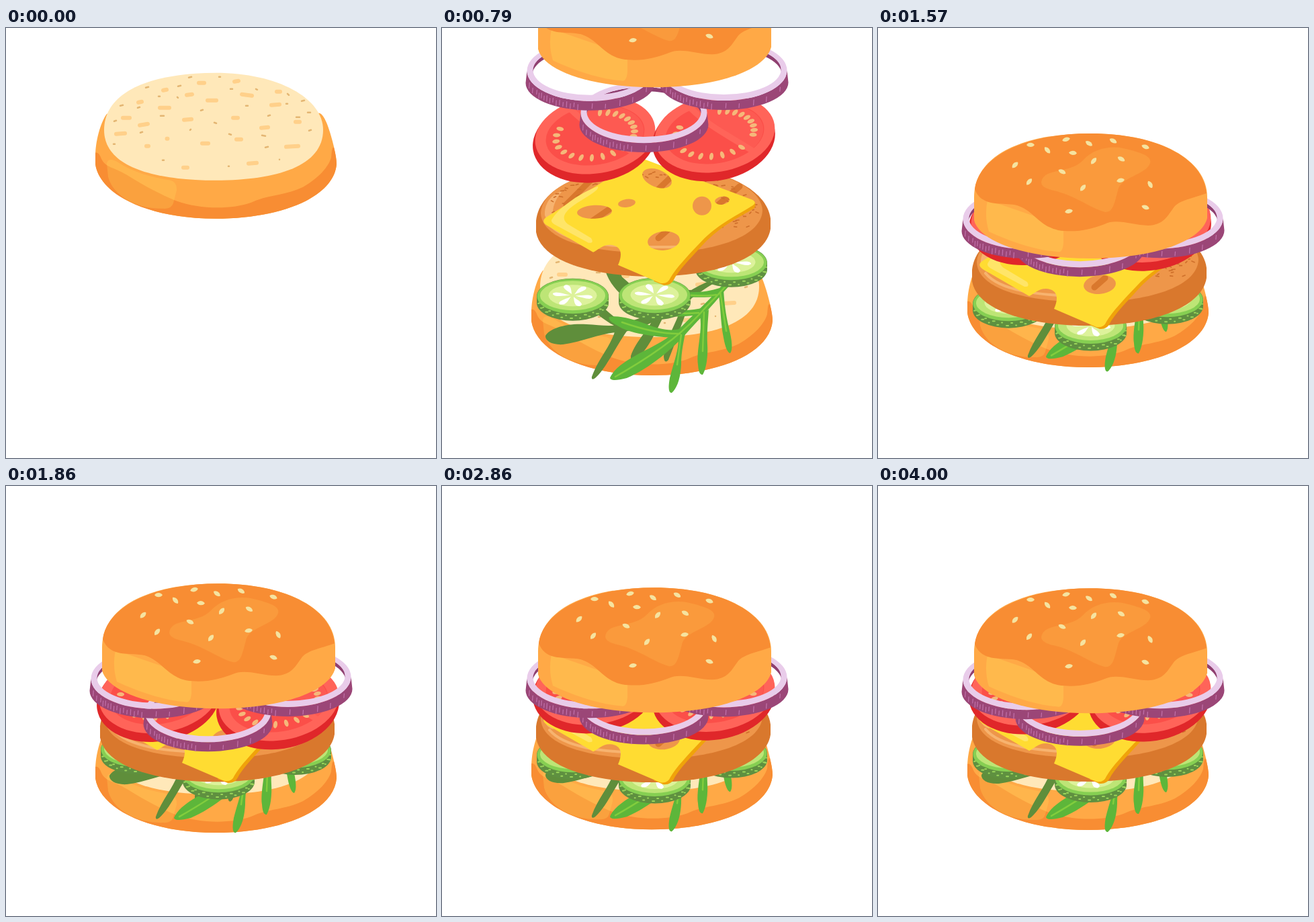
Write an HTML page that moves like this. It is 640 by 640 pixels and loops after 4070 ms.

```html
<!DOCTYPE html>
<html lang="en">
<head>
<meta charset="utf-8">
<title>Burger</title>
<style>
  html, body { margin: 0; width: 100%; height: 100%; overflow: hidden; background: #fff; }
  svg { display: block; width: 100vw; height: 100vh; }
  .line { fill: none; stroke-linecap: round; stroke-linejoin: round; }
</style>
</head>
<body>
<svg id="stage" viewBox="0 0 640 640">
  <defs>
    <g id="cucumber">
      <path fill="#5f9040" d="M-53.500 0A53.500 26.500 0 0 1 53.500 0V10A53.500 26.500 0 0 1-53.500 10Z"/>
      <g id="rind" class="line" stroke="#9bd65b" stroke-width="2"></g>
      <ellipse rx="53" ry="26" fill="#86cf52"/>
      <ellipse cy="-1" rx="48.500" ry="22" fill="#bde576"/>
      <ellipse cy="-1" rx="36" ry="16" fill="#ddf29b"/>
      <g id="petals" fill="#fff" transform="translate(0 -1) scale(1 .56)"></g>
    </g>
    <g id="tomato">
      <ellipse cy="3" rx="92" ry="62" fill="#e0272a" transform="rotate(-9)"/>
      <g transform="translate(2 -5) rotate(-9)">
        <ellipse rx="90" ry="57" fill="#ff6459"/>
        <ellipse rx="74" ry="44" fill="#fb4f49"/>
        <path fill="#fd5a52" d="M-26-41A74 44 0 0 1 52 31Z"/>
        <path class="line" stroke="#ff6459" stroke-width="9" d="M-30-44C-10-15 25 10 55 37"/>
        <g id="pips" fill="#f5b87a"></g>
      </g>
    </g>
    <g id="ring">
      <path fill="#8f3f70" d="M-86 0A86 38 0 0 1 86 0V6A86 38 0 0 0-86 6Z"/>
      <path fill="#9b4677" d="M-94 0A94 45 0 0 0 94 0L96 18A96 41 0 0 1-96 18Z"/>
      <path fill="#e9ccea" fill-rule="evenodd" d="M-94 0a94 45 0 1 0 188 0a94 45 0 1 0-188 0M-85-1a85 37 0 1 0 170 0a85 37 0 1 0-170 0"/>
      <g id="hatch" class="line" stroke="#c272ab" stroke-width="1.200"></g>
    </g>
  </defs>

  <g id="base">
    <path fill="#ffa946" d="M150 128C140 142 133 170 133 190V203C140 250 215 284 312 284C410 284 488 252 492 203C492 190 484 158 477 141Q472 129 467 127Z"/>
    <path fill="#f88d33" d="M133 186Q138 184 142 195C148 208 160 207 180 219C210 238 235 250 252 257C285 270 335 271 365 260C390 248 415 250 442 237C465 224 480 207 484 193C485 183 485 177 488 178Q492 193 492 203C488 252 410 284 312 284C215 284 140 250 133 203Z"/>
    <path fill="#ffd35a" opacity=".28" d="M150 202Q152 192 165 199C190 216 220 223 245 227Q255 230 254 242L249 261Q246 270 234 269C195 270 160 251 152 222Z"/>
    <path fill="#ffe8b9" d="M146 152C146 95 215 67 312 67C405 67 472 105 472 152C472 205 405 227 312 227C215 227 146 205 146 152Z"/>
    <path class="line" stroke="#ffd08a" stroke-width="6" d="M174 134h10M199 145l12-2M164 158l13-1M197 111l5-1M234 93l5-1M229 119h14M269 100l8-1M287 82h8M340 80l6-1M300 108h13M351 99l15 2M395 115l12-1M403 95h5M265 137l11-1M338 134h7M380 149l10-1M431 140h6M292 172h9M343 166h7M417 177l18-1M361 202l12-1M264 208h6M209 176h3M239.500 165h1"/>
    <path class="line" stroke="#e4b673" stroke-width="2.500" d="M208 89l4-1M256 87l4-1M272 74l4-1M317 73h2M334 91h3M372 91l2 1M419 98l2 2M440 109l4-1M417 113h2M449 126h4M432 133h5M451 153l3-1M357 116h3M390 131l3-1M290 123l3-1M310 141l3 1M332 158l3 1M381 160l5 1M386 178l4-1M407 196l0 0M331 206h1M233 197h2M274 152l1-1M200 156l3-1M160 173h2M161 139l3-1M170 116l4-1M196 119l3-1M227 102h2M230 131h5M255 103l1 1"/>
  </g>

  <g id="leaves">
    <g fill="#5f8e3b">
      <path d="M424 287Q428 289 421 292C400 298 375 320 345 340C315 358 285 371 262 372C240 372 210 386 180 390C163 391 153 384 154 377C160 366 185 358 215 360C235 361 250 364 265 360C300 350 330 340 355 319C380 302 405 291 424 287Z"/>
      <path d="M258 368C252 392 232 412 223 438Q222 444 228 440C245 425 260 390 278 366Z"/>
      <path d="M318 344C310 366 288 385 281 407Q280 416 287 413C308 398 318 370 334 340Z"/>
      <path d="M360 320C355 350 332 380 330 408Q331 420 337 413C346 392 360 350 376 308Z"/>
      <path d="M196 305C208 325 232 350 262 365L274 362C250 346 225 322 210 303Z"/>
      <path d="M243 280C252 310 280 327 310 349L325 343C300 325 275 288 248 277Z"/>
      <path d="M258 279Q264 275 268 290L290 310L278 316Z"/>
      <path d="M320 308C330 330 340 328 352 326L372 309Z"/>
    </g>
    <g fill="#5db63a">
      <path d="M447 257C452 253 461 257 460 264C452 276 435 295 419 312C400 335 385 350 365 372C345 395 310 425 275 440Q252 446 250 440C255 426 275 413 300 400C325 388 345 375 358 362C378 342 400 322 411 308C430 290 440 275 447 257Z"/>
      <path d="M411 312C415 330 414 355 419 380Q423 402 429 403C433 398 432 385 427 365C422 345 420 325 419 308Z"/>
      <path d="M384 348C388 370 378 400 381 420Q382 436 388 435C394 425 396 405 395 390C394 370 396 355 397 338Z"/>
      <path d="M350 374C356 390 345 415 339 440Q335 463 342 462C350 455 355 440 356 420C356 400 360 385 363 368Z"/>
      <path d="M410 318C390 322 350 318 325 319Q306 317 308 312C325 308 345 311 365 312C385 313 400 310 413 306Z"/>
      <path d="M380 346C355 350 320 350 295 344Q272 336 276 328C290 322 310 328 330 334C350 341 370 340 390 335Z"/>
      <path d="M352 380C330 380 290 376 268 366Q245 354 249 349C262 346 285 352 305 360C325 368 345 372 364 364Z"/>
    </g>
    <path class="line" stroke="#82cd3d" stroke-width="2.500" d="M453 262C440 285 415 312 395 332C365 367 330 397 258 438M408 316Q395 319 345 315M382 343Q345 346 300 337M354 374Q320 375 268 357M414 312L423 370M390 342L388 400M356 376L350 420"/>
  </g>

  <g id="cucRight"><use href="#cucumber" x="430.500" y="220.500"/></g>
  <g id="cucLeft"><use href="#cucumber" x="194.500" y="280"/></g>
  <g id="cucFront"><use href="#cucumber" x="316.500" y="275.500"/></g>

  <g id="patty">
    <path fill="#d9782d" d="M140 148C146 92 230 66 316 66C405 66 482 95 489 145V160C482 205 405 231 314 231C220 231 147 207 140 165Z"/>
    <path fill="#ee964a" d="M147 136C150 95 225 67 316 67C400 67 475 93 477 133C475 174 400 196 314 196C225 196 148 178 147 136Z"/>
    <path fill="#f7b36f" d="M153 140C152 122 163 108 179 104C167 118 162 132 166 152Q156 150 153 140Z"/>
    <path class="line" stroke="#f7b36f" stroke-width="4" d="M160 153C178 175 225 190 352 187"/>
    <path class="line" stroke="#d9782d" stroke-width="9" d="M230 79L185 124M342 82L312 111M443 97L406 129M249 131L217 153M338 160L322 174"/>
    <g id="specks" class="line" stroke="#cf702b" stroke-width="1.700"></g>
  </g>

  <g id="cheese">
    <path fill="#f0a30a" d="M464 124Q469 131 464 136C440 150 415 162 390 188C370 210 352 228 345 242Q340 251 330 250L315 244L395 160Z"/>
    <path id="slice" fill="#ffdc32" fill-rule="evenodd"/>
    <path fill="#ffe568" d="M163 153C170 139 200 115 232 103C235 109 215 118 195 132C180 143 178 152 187 159L222 180Q227 188 218 187L170 161Q162 157 163 153Z"/>
  </g>

  <g id="tomLeft"><use href="#tomato" x="226" y="304"/></g>
  <g id="tomRight"><use href="#tomato" x="404" y="297"/></g>

  <g id="ringFront"><use href="#ring" x="300.500" y="276"/></g>
  <g id="ringLeft"><use href="#ring" x="220.500" y="203"/></g>
  <g id="ringRight"><use href="#ring" x="419.500" y="200"/></g>

  <g id="crown">
    <path fill="#ffa946" d="M143 142C143 80 215 47 316 47C418 47 490 85 490 142V173C482 206 415 233 315 233C215 233 150 206 143 176Z"/>
    <path fill="#ffb94c" d="M163 146L276 185V210Q275 226 266 223C235 221 195 207 165 193Q158 170 163 146Z"/>
    <path fill="#f88d33" d="M144 130C150 82 218 47 316 47C415 47 484 83 489 136C470 143 450 146 441 156C430 171 425 183 402 184C380 184 355 173 337 182C315 190 295 195 268 191C240 185 232 162 207 154C185 149 155 158 144 130Z"/>
    <path fill="#fa9a3c" d="M243 120C246 97 285 108 305 87C320 70 345 65 365 69C390 75 408 80 405 91C400 108 360 112 357 132C352 150 350 165 338 164C315 158 295 140 262 132Q243 128 243 120Z"/>
    <g id="sesame" fill="#f5e3a0"></g>
  </g>
</svg>

<script>
const LOOP = 4070, STEPS = 57;
const FALL = 0.5, AMP = 41, PERIOD = 0.62, DECAY = 1.65;

const $ = id => document.getElementById(id);
const fill = (id, items) => { $(id).innerHTML = items.join(''); };
const range = n => [...Array(n).keys()];

let seed = 11;
const rand = () => (seed = seed * 16807 % 2147483647) / 2147483647;

const oval = ([x, y, rx, ry, rot]) => {
  const a = rot * Math.PI / 180, dx = rx * Math.cos(a), dy = rx * Math.sin(a);
  return `M${x - dx} ${y - dy}a${rx} ${ry} ${rot} 1 0 ${2 * dx} ${2 * dy}a${rx} ${ry} ${rot} 1 0 ${-2 * dx} ${-2 * dy}`;
};

const holes = [
  [320, 91, 23, 13, 22], [275, 128, 13, 6, -8], [227, 141, 26, 10, -3],
  [387, 132, 14, 14, 0], [417, 124, 11, 6, -8], [330, 184, 24, 14, -6]
];
$('slice').setAttribute('d',
  'M289 65Q297 60 305 64L462 123Q469 127 463 131C440 146 412 158 386 185' +
  'C365 207 349 224 340 239Q336 249 325 247L262 220C270 202 266 191 250 190' +
  'C238 190 232 198 225 201L156 161Q147 155 155 149Z' + holes.map(oval).join(''));

const sesame = [
  [204, 94, -45], [227, 64, 0], [252, 72, 50], [280, 56, -15], [290, 76, 5], [314, 62, 35],
  [350, 58, 30], [398, 67, 20], [321, 88, -50], [362, 85, 30], [274, 104, 25], [225, 119, -50],
  [305, 128, -50], [361, 117, -10], [405, 123, 60], [398, 157, 20], [284, 163, -10]
];
fill('sesame', sesame.map(([x, y, r]) =>
  `<path transform="translate(${x} ${y}) rotate(${r})" d="M-6 0Q-3-4 2-3Q5-2 6 0Q4 3 0 3Q-4 3-6 0Z"/>`));

fill('petals', range(6).map(i =>
  `<path transform="rotate(${i * 60 + 10})" d="M4 0C12-2 18-6 26-5Q34 0 26 4C19 5 12 2 4 0Z"/>`));

fill('rind', range(22).map(i => {
  const a = (8 + i * 7.8) * Math.PI / 180, drop = 3 + i % 2 * 4;
  return `<path d="M${52 * Math.cos(a)} ${26 * Math.sin(a) + drop}h${1 + i % 3}"/>`;
}));

const pipAngles = [...range(11).map(i => 52 + i * 16), ...range(9).map(i => -78 + i * 12)];
fill('pips', pipAngles.map(deg => {
  const a = deg * Math.PI / 180, x = 59 * Math.cos(a), y = 33 * Math.sin(a);
  const tilt = Math.atan2(y, x) * 180 / Math.PI;
  return `<ellipse rx="5.5" ry="3" transform="translate(${x} ${y}) rotate(${tilt})"/>`;
}));

const hatchAngles = [28, 48, 62, 76, 88, ...range(14).map(i => 101 + i * 3.5), 154, 162];
fill('hatch', hatchAngles.map((deg, i) => {
  const a = deg * Math.PI / 180;
  return `<path d="M${95 * Math.cos(a)} ${45 * Math.sin(a) + 4 + i % 2 * 2}l-.5 ${6 + i % 3}"/>`;
}));

fill('specks', range(95).map(i => {
  const a = (i * 2.4 - 195) * Math.PI / 180, r = 0.7 + rand() * 0.26;
  const x = 312 + 162 * r * Math.cos(a), y = 133 + 65 * r * Math.sin(a);
  return `<path d="M${x} ${y}l${2 + rand() * 3} ${rand() * 4 - 2}"/>`;
}));

// id, drop from drawn place to rest (px), landing time (s), fall speed (px/s)
const layers = [
  ['base', 228, 0.495, 461], ['leaves', 53, 0.595, 560],
  ['cucRight', 176, 0.89, 451], ['cucLeft', 119, 0.785, 418], ['cucFront', 159, 0.87, 430],
  ['patty', 209, 0.93, 486], ['cheese', 193, 0.915, 465],
  ['tomLeft', 0, 1.07, 490], ['tomRight', 18, 1.11, 470],
  ['ringLeft', 85, 1.245, 488], ['ringRight', 86, 1.25, 480], ['ringFront', 52, 1.17, 525],
  ['crown', 105, 1.28, 505]
].map(([id, rest, land, speed]) => ({ el: $(id), rest, land, speed }));

function offset(s, speed) {
  if (s < 0) return speed * s;
  return AMP * Math.sin(2 * Math.PI * s / PERIOD) * Math.exp(-DECAY * s);
}

function draw(ms) {
  const step = Math.floor(ms / LOOP * STEPS + 0.06) % STEPS;
  const t = step * LOOP / STEPS / 1000;
  for (const { el, rest, land, speed } of layers) {
    const s = t - land;
    el.setAttribute('visibility', s < -FALL ? 'hidden' : 'visible');
    el.setAttribute('transform', `translate(0 ${(rest + offset(s, speed)).toFixed(2)})`);
  }
}

const start = performance.now();
function tick() {
  draw((performance.now() - start) % LOOP);
  requestAnimationFrame(tick);
}
tick();
</script>
</body>
</html>
```
